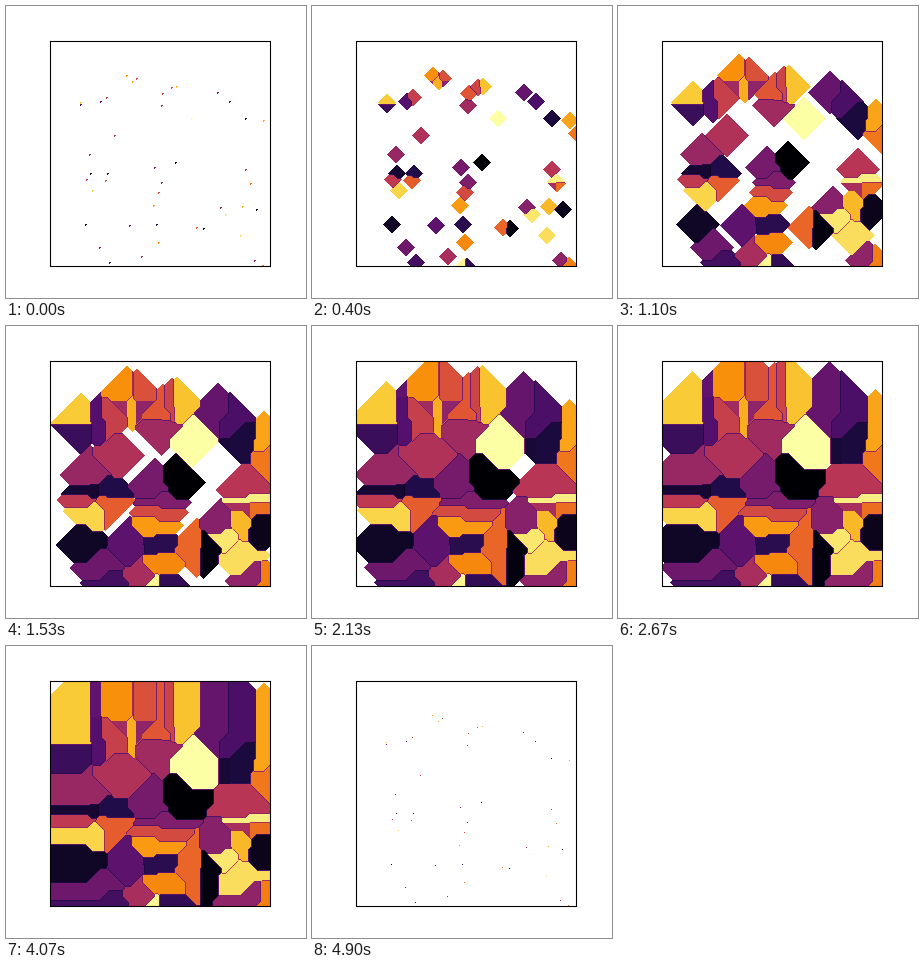
These frames come from a looping animation (300x292 px, 4930 ms). An HTML page with a canvas:

```html
<!DOCTYPE html>
<html lang="en">
<head>
<meta charset="utf-8">
<title>Growing Manhattan Voronoi cells</title>
<style>
html, body { margin: 0; width: 100%; height: 100%; overflow: hidden; background: #fff; }
canvas { display: block; width: 300px; height: 292px; image-rendering: pixelated; }
</style>
</head>
<body>
<canvas id="stage" width="300" height="292"></canvas>
<script>
const LOOP = 4930, STEP = 100 / 3, STEPS = 148, CLEAR_STEP = 144;
const LEFT = 45, TOP = 36, WIDTH = 219, HEIGHT = 224;
const GROWTH = 0.63, START_RADIUS = 1.35, SEAM_DIM = 0.55;
const WHITE = [255, 255, 255];

const ramp = ['#000004', '#210c4a', '#57106e', '#8a226a', '#bc3754', '#e45a31', '#f98e09', '#f9cb35', '#fcffa4']
  .map(hex => [1, 3, 5].map(i => parseInt(hex.slice(i, i + 2), 16)));

// Where cells start, from the darkest to the lightest; the rank alone sets the shade.
const centres = [
  [169, 156], [197, 222], [250, 203], [79, 218], [84, 167], [239, 112], [101, 167], [150, 218], [154, 260], [74, 98],
  [103, 256], [223, 95], [94, 95], [123, 219], [211, 86], [93, 241], [148, 161], [155, 176], [214, 201], [248, 254],
  [83, 148], [155, 99], [135, 250], [108, 129], [239, 163], [80, 173], [100, 91], [165, 81], [152, 186], [130, 72],
  [156, 87], [99, 174], [190, 221], [244, 177], [264, 127], [256, 259], [152, 236], [120, 69], [147, 199], [257, 114],
  [126, 75], [236, 200], [170, 80], [74, 96], [86, 184], [234, 229], [219, 208], [243, 175], [151, 260], [185, 112]
];

// Centres sit slightly off the pixel grid, so young cells are uneven dots.
const seeds = centres.map(([x, y], rank) => ({
  x: x + 0.375, y: y + 0.125, rank, shade: rank / (centres.length - 1)
}));

function colorAt(value) {
  const pos = value * (ramp.length - 1);
  const i = Math.min(Math.floor(pos), ramp.length - 2);
  return ramp[i].map((c, n) => Math.round(c + (ramp[i + 1][n] - c) * (pos - i)));
}

// Nearest cell of a pixel; the darker side of each border carries a dim seam.
function cellAt(x, y) {
  let best = Infinity, next = Infinity, owner, rival;
  for (const seed of seeds) {
    const d = Math.abs(seed.x - x) + Math.abs(seed.y - y);
    if (d < best) {
      next = best; rival = owner;
      best = d; owner = seed;
    } else if (d < next) {
      next = d; rival = seed;
    }
  }
  const seam = next - best < 2 && owner.rank < rival.rank;
  const shade = seam ? SEAM_DIM * (owner.shade + rival.shade) / 2 : owner.shade;
  return { distance: best, color: colorAt(shade) };
}

const cells = Array.from({ length: WIDTH * HEIGHT },
  (_, p) => cellAt(LEFT + p % WIDTH, TOP + Math.floor(p / WIDTH)));

const ctx = document.getElementById('stage').getContext('2d');
const image = ctx.createImageData(WIDTH, HEIGHT);
image.data.fill(255);
let shownStep = -1;

function draw(step) {
  const age = step < CLEAR_STEP ? step : step - STEPS;
  const radius = START_RADIUS + GROWTH * age;
  cells.forEach(({ distance, color }, p) => {
    image.data.set(distance < radius ? color : WHITE, 4 * p);
  });
  ctx.fillStyle = '#fff';
  ctx.fillRect(0, 0, 300, 292);
  ctx.putImageData(image, LEFT, TOP);
  ctx.lineWidth = 1.1;
  ctx.strokeRect(LEFT - 0.5, TOP - 0.5, WIDTH + 1, HEIGHT + 1);
}

const start = performance.now();

function tick() {
  const time = Math.max(0, performance.now() - start) % LOOP;
  const step = Math.min(STEPS - 1, Math.floor((time + 4) / STEP));
  if (step !== shownStep) draw(shownStep = step);
  requestAnimationFrame(tick);
}
tick();
</script>
</body>
</html>
```
